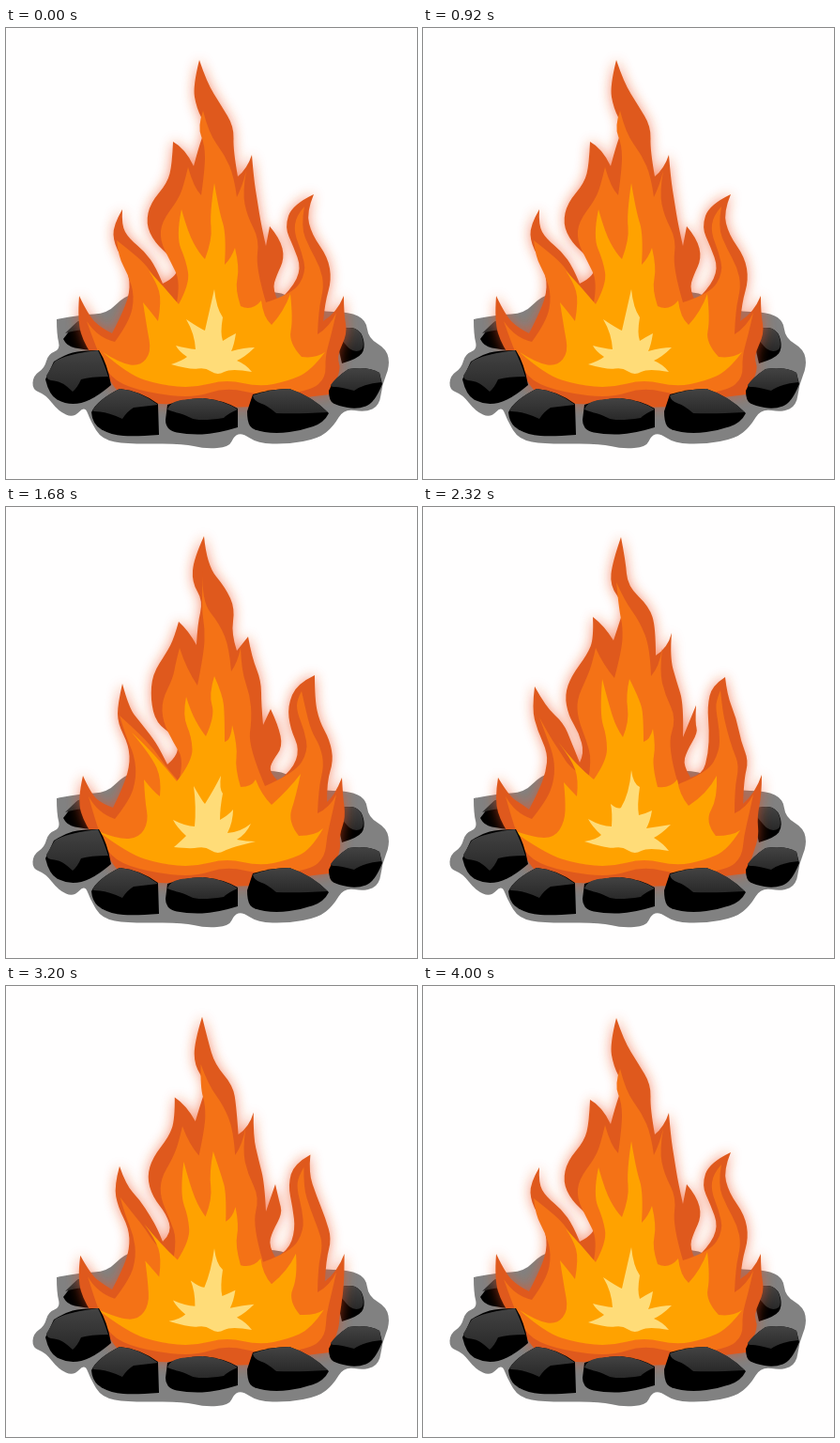
Animation, 438 px wide and 480 px high, one loop 4.04 s. Source, as an HTML page:

```html
<!DOCTYPE html>
<html lang="en">
<head>
<meta charset="utf-8">
<title>Campfire</title>
<style>
html, body { margin: 0; width: 100%; height: 100%; overflow: hidden; background: #fffefe; }
svg { display: block; width: 100vw; height: 100vh; }
</style>
</head>
<body>
<svg viewBox="0 0 438 480">
  <defs>
    <linearGradient id="lit" x1="0" y1="0" x2="0" y2="1">
      <stop offset="0" stop-color="#434343"/>
      <stop offset="1" stop-color="#292929"/>
    </linearGradient>
    <filter id="blur" x="-20%" y="-20%" width="140%" height="140%">
      <feGaussianBlur stdDeviation="7"/>
    </filter>
  </defs>
  <g id="ground"></g>
  <path id="glow" fill="#f0501e" opacity=".62" filter="url(#blur)"/>
  <path id="outer" fill="#df591d"/>
  <path id="middle" fill="#f47216"/>
  <path id="inner" fill="#ffa200"/>
  <path id="core" fill="#ffdc78"/>
  <g id="stones"></g>
</svg>
<script>
// "x,y" is a rounded point, "x,y!" a sharp one.
const parse = text => text.trim().split(/\s+/).map(word => {
  const [x, y] = word.replace('!', '').split(',').map(Number);
  return { x, y, sharp: word.endsWith('!') };
});

const outline = points => {
  const at = (x, y) => x.toFixed(1) + ' ' + y.toFixed(1);
  let d = 'M' + at(points[0].x, points[0].y);
  for (let i = 1; i < points.length; i++) {
    const p = points[i], next = points[(i + 1) % points.length];
    if (p.sharp) {
      d += 'L' + at(p.x, p.y);
    } else {
      const end = next.sharp ? next : { x: (p.x + next.x) / 2, y: (p.y + next.y) / 2 };
      d += 'Q' + at(p.x, p.y) + ' ' + at(end.x, end.y);
    }
  }
  return d + 'Z';
};

const byId = id => document.getElementById(id);

const addShape = (parent, text, fill) => {
  const path = document.createElementNS('http://www.w3.org/2000/svg', 'path');
  path.setAttribute('d', outline(parse(text)));
  path.setAttribute('fill', fill);
  byId(parent).append(path);
};

const addStone = (parent, body, top) => {
  addShape(parent, body, '#000');
  addShape(parent, top, 'url(#lit)');
};

addShape('ground', `54,310! 80,305 108,304 126,285 155,278 285,280 302,285 332,302 366,302
  384,311 386,330 406,342 409,360 401,379 398,402 383,409 360,405 349,424 333,437 300,443 268,442
  252,431 243,434 238,446 212,448 188,442 130,443 102,438 90,418 84,402 72,415 56,408 42,390
  28,385 29,370 41,362 45,347 58,342 54,326`, '#818181');
addStone('ground', '61,331! 70,319 79,310 96,312 100,344! 82,342 65,339', '63,325! 71,317 79,310 96,312 90,322 75,321');
addStone('ground', '350,322! 365,317 379,323 383,341 375,352 358,357!', '350,322! 365,317 379,323 382,342 371,345 362,338');

addStone('stones',
  '42,374! 51,355! 62,348 80,343 99,343! 108,357 112,380! 99,391 80,400 63,400 46,391',
  '43,370! 52,355! 64,347 98,343! 104,355 109,371! 90,371 80,374! 76,383 71,387! 60,376 43,375');
addStone('stones',
  '91,409! 97,396 121,384! 143,386 162,400! 163,433! 138,435 112,433 92,422',
  '92,407! 99,395 121,384! 143,386 162,401! 136,404! 129,408 124,416! 109,409 92,408');
addStone('stones',
  '170,417! 172,401! 187,395 210,394! 232,396 247,405! 247,425! 224,432 194,433 170,428',
  '172,406! 174,400 188,395 210,394! 232,396 247,406! 237,410 232,415! 205,419 189,411 180,409');
addStone('stones',
  '257,408! 263,390! 282,384 302,384! 326,392 344,410! 339,420 316,428 288,432 263,428 257,419',
  '263,391! 282,384 302,384! 325,391 343,409! 309,411 288,410! 279,402 264,397');
addStone('stones',
  '344,386! 349,373 365,363! 386,360 398,367! 401,379! 393,399 374,406 354,402 344,397',
  '346,380! 351,372 365,363! 386,360 398,367! 400,377! 380,379 371,386! 356,382 346,382');

// Three poses per layer, followed by the part they share.
const shapes = {
  outer: [
    `78,285! 88,306 101,319 113,325!
     126,300 133,276 128,252 115,230 114,210 124,193! 123,210 131,224 148,238 160,255 167,272!
     185,263 178,246 158,228 149,208 154,186 172,165 177,145 178,121! 191,128 200,147!
     205,128 213,105 203,85 199,62 206,34! 214,58 229,82 243,105 242,130 247,158!
     257,150 262,135! 264,160 268,185 272,210 277,232!
     281,211! 292,224 297,245 288,264 284,278 290,291!
     304,278 315,256 306,232 297,212 305,188 328,177! 320,196 326,220 343,244 347,268 340,292 338,312!
     352,304 360,285! 360,305 364,325 352,350 358,365 345,390!`,
    `80,288! 92,308 105,316 113,322!
     123,303 131,282 133,262 122,238 116,215 119,191! 131,213 150,230 158,250 163,262 167,272!
     172,262 166,240 155,222 151,200 158,180 175,157 182,140 181,117! 193,126 203,142!
     207,130 215,105 199,84 202,58 211,32! 216,58 218,84 241,106 248,128 248,158!
     261,150 265,134! 263,160 270,185 278,210 277,245!
     291,211! 290,230 293,240 281,260 277,275 285,288!
     298,285 304,262 305,238 303,212 308,190 322,181! 324,200 334,225 339,250 347,270 342,290 341,316!
     354,305 361,285! 361,305 356,330 358,350 352,368 345,390!`,
    `82,286! 91,306 103,316 114,320!
     123,302 132,276 131,254 119,230 119,210 124,188! 131,214 143,229 158,248 166,262 172,274!
     185,263 180,244 160,230 154,205 156,178 171,155 179,140 184,122! 195,132 203,147!
     204,125 210,100 198,80 200,55 211,31! 214,62 234,86 244,108 240,135 246,153!
     250,148 258,138! 262,160 272,185 272,210 274,232!
     282,215! 290,232 295,255 284,270 280,282 290,292!
     305,280 313,258 303,236 300,212 310,188 329,179! 329,205 334,228 345,248 349,270 342,292 342,314!
     350,308 358,288! 359,308 362,330 355,350 357,368 345,390!`,
    '300,395 262,404 230,403 200,397 165,402 122,392 106,368 84,338 76,312'
  ],
  middle: [
    `86,312! 98,330 116,334! 132,312 137,285 130,262 120,244 118,226! 136,240 151,254 164,275 182,292!
     186,270 175,248 164,226 166,206 184,182 190,165 194,148! 200,170 208,178!
     212,150 212,125 204,105 210,88! 216,112 233,135 243,158 246,180!
     252,168 256,152! 252,175 257,200 270,225 266,255 277,292!
     306,283 320,260 315,238 307,218 309,200 318,190! 314,212 324,235 335,255 339,275 333,300 332,326!
     345,318 352,303! 347,325 340,350 341,372`,
    `88,308! 98,326 116,332! 132,312 140,290 140,268 132,245 124,224! 135,244 147,262 157,278 176,290!
     180,270 174,248 165,225 164,205 173,185 180,168 184,150! 192,168 204,182!
     212,152 213,128 209,110 206,80! 215,100 231,122 242,150 243,180!
     252,170 255,150! 252,175 258,200 270,225 260,255 272,295!
     303,283 316,260 316,238 312,215 313,205 317,195! 319,216 324,238 330,258 337,275 332,300 332,326!
     345,320 352,306! 348,325 342,350 340,372`,
    `88,308! 98,326 116,332! 132,312 139,288 137,265 128,245 121,222! 141,240 158,258 170,276 184,292!
     190,270 178,250 167,228 166,206 178,182 181,165 185,150! 192,172 204,190!
     211,155 212,130 208,105 210,68! 208,100 228,125 238,150 240,175!
     247,165 250,150! 251,175 260,200 262,225 258,255 276,297!
     308,283 322,260 318,238 310,218 310,205 315,196! 319,214 325,238 335,255 339,275 333,300 332,326!
     345,320 352,306! 348,325 342,350 340,372`,
    '325,386 275,392 235,382 200,394 150,388 115,376 100,352'
  ],
  inner: [
    `103,345! 122,357 143,360 155,345 150,318 146,292! 156,304 162,312! 166,290 160,270 152,258!
     168,275 184,294! 196,272 192,248 181,222 187,193! 194,218 206,240 212,246!
     220,225 217,198 222,165! 227,195 235,220 233,252! 240,245 244,234! 249,255 244,278 250,296!
     262,302 272,290! 274,308 283,316! 296,302 303,283! 306,310 301,335 315,350! 330,352 340,345!`,
    `93,343! 118,352 140,352 151,335 152,312 150,293! 158,302 164,308! 166,290 158,268 144,250!
     163,275 182,290! 196,270 196,245 188,220 191,183! 198,210 206,235 213,245!
     220,228 216,200 220,183! 231,205 235,222 235,250! 242,248 245,236! 248,255 244,275 250,298!
     263,300 271,290! 273,306 283,318! 303,305 313,286! 314,310 300,335 312,350! 330,350 338,344!`,
    `98,345! 120,354 142,352 152,335 148,312 147,290! 157,303 164,308! 166,290 155,265 134,240!
     158,262 182,292! 199,270 198,245 188,222 192,202! 197,218 208,238 213,244!
     223,222 216,200 222,180! 231,200 233,222 233,250! 240,248 241,232! 247,255 244,278 250,298!
     262,298 266,290! 272,306 283,317! 300,302 314,284! 309,308 300,335 312,350! 330,350 338,342!`,
    '325,365 300,376 270,382 235,374 200,383 165,380 130,369'
  ],
  core: [
    `176,358! 188,354 193,350! 184,344 181,338! 193,341 202,342! 201,325 192,310! 207,320 212,322!
     217,300 222,278! 224,298 231,308! 228,325 231,333! 239,328 245,325! 243,338 240,344!
     254,340 265,340! 255,350 246,354! 256,358 262,366!`,
    `172,356! 185,354 190,349! 180,340 176,332! 190,340 201,340! 202,325 200,316! 207,322 211,320!
     220,305 222,280! 224,295 231,298! 228,318 230,328! 238,326 244,323! 242,335 238,342!
     252,340 264,338! 254,348 246,352! 256,358 262,366!`,
    `179,362! 187,355 192,350! 182,341 178,333! 192,340 201,340! 203,320 200,297! 209,313 212,316!
     222,300 229,286! 227,300 231,305! 228,320 228,333! 237,328 242,322! 242,335 236,347!
     250,346 261,337! 256,348 246,354! 256,356 266,356!`,
    '240,362 225,370 212,361 197,364'
  ]
};

const layers = Object.entries(shapes).map(([id, [a, b, c, shared]]) => ({
  id, poses: [a, b, c].map(pose => parse(pose + ' ' + shared))
}));

// [phase, pose] over one flicker
const keys = [[0, 0], [0.297, 1], [0.56, 2], [0.66, 2], [0.84, 0], [1, 0]];
const LOOP = 4040, FLICKER = LOOP / 4, STEP = 40;

function draw(time) {
  const phase = time % FLICKER / FLICKER;
  const k = keys.findIndex(key => key[0] > phase);
  const [start, from] = keys[k - 1], [end, to] = keys[k];
  const mix = (1 - Math.cos(Math.PI * (phase - start) / (end - start))) / 2;
  for (const { id, poses } of layers) {
    const d = outline(poses[from].map((p, i) => {
      const q = poses[to][i];
      return { x: p.x + (q.x - p.x) * mix, y: p.y + (q.y - p.y) * mix, sharp: p.sharp };
    }));
    byId(id).setAttribute('d', d);
    if (id === 'outer') byId('glow').setAttribute('d', d);
  }
}

const origin = performance.now();
function tick() {
  const time = Math.max(0, performance.now() - origin) % LOOP;
  draw(Math.floor(time / STEP) * STEP);
  requestAnimationFrame(tick);
}
tick();
</script>
</body>
</html>
```
